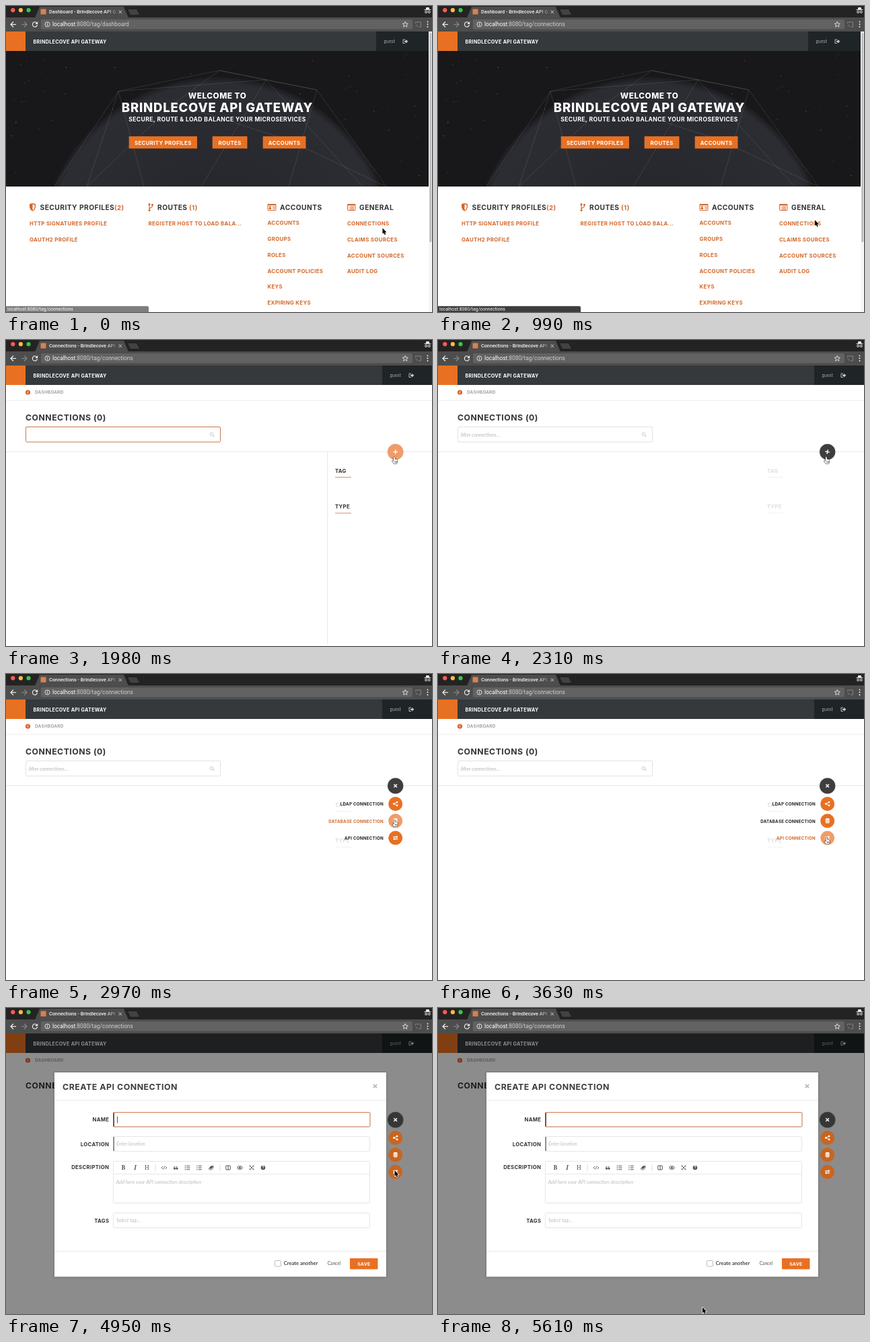
An HTML page with a canvas that plays this animation: 633 by 456 pixels, repeating every 5.94 s.

```html
<!DOCTYPE html>
<html lang="en">
<head>
<meta charset="utf-8">
<title>API gateway</title>
<style>
html, body { margin: 0; width: 100%; height: 100%; overflow: hidden; background: #fff; }
canvas { display: block; width: 633px; height: 456px; }
</style>
</head>
<body>
<canvas id="stage"></canvas>
<script>
const W = 633, H = 456, STEP = 330, LOOP = 5940;
const canvas = document.getElementById('stage');
const c = canvas.getContext('2d');
const ratio = window.devicePixelRatio || 1;
canvas.width = W * ratio;
canvas.height = H * ratio;

const ORANGE = '#e87022', LINK = '#d2682a', INK = '#343434';
const HEAD = 'Inter, sans-serif', UI = 'Roboto, sans-serif', BODY = 'Lato, sans-serif';
const PRODUCT = 'Brindlecove API Gateway';

// step, x, y, kind
const CURSOR = [
  [0, 559.5, 331, 'arrow'], [2, 560, 320, 'hand'], [3, 560, 319, 'arrow'],
  [5, 574, 192, 'arrow'], [6, 577, 174, 'hand'], [9, 577.5, 217, 'hand'],
  [10, 577.5, 243, 'hand'], [12, 577.5, 242, 'arrow'], [16, 472, 348, 'arrow'],
  [17, 393, 446, 'arrow']
];

function rect(x, y, w, h, fill) {
  c.fillStyle = fill;
  c.fillRect(x, y, w, h);
}
function box(x, y, w, h, stroke, r = 1, fill) {
  c.beginPath();
  c.roundRect(x, y, w, h, r);
  if (fill) { c.fillStyle = fill; c.fill(); }
  if (stroke) { c.strokeStyle = stroke; c.lineWidth = 1; c.stroke(); }
}
function disc(x, y, r, fill) {
  c.fillStyle = fill;
  c.beginPath();
  c.arc(x, y, r, 0, 7);
  c.fill();
}
function ring(x, y, r, stroke, width = 1, from = 0, to = 7) {
  c.strokeStyle = stroke;
  c.lineWidth = width;
  c.beginPath();
  c.arc(x, y, r, from, to);
  c.stroke();
}
function trace(pts) {
  c.beginPath();
  for (let i = 0; i < pts.length; i += 2) c.lineTo(pts[i], pts[i + 1]);
}
function line(pts, stroke, width = 1) {
  trace(pts);
  c.strokeStyle = stroke;
  c.lineWidth = width;
  c.stroke();
}
function poly(pts, fill) {
  trace(pts);
  c.closePath();
  c.fillStyle = fill;
  c.fill();
}
function text(str, x, y, size, fill, font = UI, style = '400', align = 'left') {
  c.font = `${style} ${size}px ${font}`;
  c.textAlign = align;
  c.fillStyle = fill;
  c.fillText(str, x, y);
}
// headings are set low and wide
function head(str, x, y, size, fill, align = 'left', weight = '700') {
  c.letterSpacing = `${size * 0.04}px`;
  text(str, x, y, size * 0.945, fill, HEAD, weight, align);
  c.letterSpacing = '0px';
}
function seeded(seed) {
  return () => (seed = (seed * 16807) % 2147483647) / 2147483647;
}

function drawChrome(page, url) {
  rect(0, 0, W, 18, '#232323');
  ['#fc5b57', '#fdbd3e', '#34c84a'].forEach((col, i) => disc(10.3 + i * 11.6, 6.2, 3.1, col));
  rect(0, 17, W, 21, '#4d4d4d');
  poly([43, 17.5, 50, 1, 175, 1, 182, 17.5], '#4d4d4d');
  poly([181, 5, 194, 5, 198, 13, 185, 13], '#424242');
  rect(51.5, 4.5, 8, 8, '#d9814c');

  c.save();
  c.beginPath();
  c.rect(60, 0, 103, 17);
  c.clip();
  const fade = c.createLinearGradient(148, 0, 163, 0);
  fade.addColorStop(0, '#f2f2f2');
  fade.addColorStop(1, '#777');
  text(`${page} - ${PRODUCT}`, 64, 11.3, 7.25, fade, UI, '500');
  c.restore();
  line([167.5, 6.5, 172, 11], '#ccc');
  line([172, 6.5, 167.5, 11], '#ccc');

  // incognito badge
  poly([623.5, 5.5, 624.5, 2, 628.5, 2, 629.5, 5.5], '#eee');
  rect(621.5, 5.2, 10, 1, '#eee');
  ring(624.2, 9, 1.5, '#eee');
  ring(628.8, 9, 1.5, '#eee');

  line([15, 27.5, 7, 27.5], '#eee', 1.2);
  line([11, 23.5, 7, 27.5, 11, 31.5], '#eee', 1.2);
  line([23, 27.5, 31, 27.5], '#858585', 1.2);
  line([27, 23.5, 31, 27.5, 27, 31.5], '#858585', 1.2);
  ring(43, 27.5, 3.6, '#eee', 1.2, 0.2, 5.5);
  poly([47.2, 23, 47.2, 27, 43.2, 27], '#eee');

  box(52, 20, 552, 14.5, null, 2, '#626262');
  ring(61.5, 27.3, 3.5, '#e4e4e4');
  rect(61, 26.6, 1, 2.8, '#e4e4e4');
  rect(61, 25, 1, 1, '#e4e4e4');
  text('localhost', 69, 30.3, 8.4, '#fff');
  const hostWidth = c.measureText('localhost').width;
  text(url, 69 + hostWidth, 30.3, 8.4, '#cfcfcf');

  const star = [];
  for (let i = 0; i <= 10; i++) {
    const a = i * Math.PI / 5 - Math.PI / 2, r = i % 2 ? 1.9 : 4.3;
    star.push(593.3 + r * Math.cos(a), 27.6 + r * Math.sin(a));
  }
  line(star, '#e8e8e8', 0.9);
  line([608.5, 26, 608.5, 24, 616.5, 24, 616.5, 31, 613, 31], '#8a8a8a', 0.9);
  ring(608.5, 31, 2.6, '#8a8a8a', 0.8, -1.57, 0);
  [23.5, 27.3, 31].forEach(y => disc(626.5, y, 1, '#eee'));
}

function drawHeader(right, split) {
  rect(0, 38, right, 29, '#35393c');
  rect(split, 38, right - split, 29, '#1f2427');
  rect(0, 38, 29, 29, ORANGE);
  head(PRODUCT.toUpperCase(), 40.5, 56, 7.6, '#fff');
  text('guest', split + 11.5, 55, 6.9, '#aaa', BODY);
  const x = split + 40;
  line([x + 3, 50, x, 50, x, 55.5, x + 3, 55.5], '#ccc', 0.9);
  rect(x + 2, 51.8, 3, 2, '#ccc');
  poly([x + 4.2, 49.8, x + 7.3, 52.8, x + 4.2, 55.8], '#ccc');
}

function drawHero() {
  c.save();
  c.beginPath();
  c.rect(0, 67, 628, 202);
  c.clip();
  rect(0, 67, 628, 203, '#18181a');
  const rand = seeded(41);
  for (let i = 0; i < 150; i++) {
    c.globalAlpha = 0.15 + rand() * 0.35;
    disc(rand() * 628, 67 + rand() * 200, 0.3 + rand() * 0.5, '#b5aaa0');
  }
  c.globalAlpha = 1;
  const globe = c.createRadialGradient(314, 370, 60, 314, 370, 264);
  globe.addColorStop(0, '#25262c');
  globe.addColorStop(0.6, '#2a2b31');
  globe.addColorStop(0.95, '#2c2d33');
  globe.addColorStop(1, '#1c1c1f');
  disc(314, 370, 264, globe);
  const web = 'rgba(190,190,195,.22)';
  [
    [72, 269, 167, 127, 317, 96, 462, 125, 565, 269],
    [167, 127, 386, 110, 530, 269], [167, 127, 205, 269],
    [317, 96, 250, 145, 120, 269], [386, 110, 290, 269],
    [317, 96, 386, 110, 462, 125, 420, 269],
    [250, 145, 420, 200, 565, 269], [167, 127, 120, 269]
  ].forEach(p => line(p, web, 0.7));
  c.restore();

  head('WELCOME TO', 314, 138, 12.5, '#fff', 'center', '800');
  head(PRODUCT.toUpperCase(), 314, 158.3, 19.6, '#fff', 'center', '800');
  head('SECURE, ROUTE & LOAD BALANCE YOUR MICROSERVICES', 314, 172.3, 9.15, '#fff', 'center');
  [['SECURITY PROFILES', 182.7, 101.3], ['ROUTES', 306.7, 51.8], ['ACCOUNTS', 381.7, 63.8]].forEach(([s, x, w]) => {
    rect(x, 194.2, w, 18.2, ORANGE);
    head(s, x + w / 2, 206.5, 8.3, '#fff', 'center');
  });
}

function drawList(title, x, first, items, indent, count, countX) {
  head(title, x + indent, 304, 10.85, INK);
  if (count) head(count, countX, 304, 10.2, LINK);
  items.forEach((s, i) => head(s, x, first + i * 23.75, 8.3, LINK));
}

function drawDashboard() {
  rect(0, 38, W, 418, '#fff');
  drawHeader(628, 550);
  drawHero();
  rect(628, 38, 5, 418, '#f6f6f6');
  box(629.3, 40, 3, 312, null, 1.5, '#bdbdbd');

  drawList('SECURITY PROFILES', 35, 327.2, ['HTTP SIGNATURES PROFILE', 'OAUTH2 PROFILE'], 15.5, '(2)', 161);
  drawList('ROUTES', 211.5, 327.2, ['REGISTER HOST TO LOAD BALA...'], 13.5, '(1)', 272);
  drawList('ACCOUNTS', 388.5, 326.3, ['ACCOUNTS', 'GROUPS', 'ROLES', 'ACCOUNT POLICIES', 'KEYS', 'EXPIRING KEYS'], 18.5);
  drawList('GENERAL', 507, 327, ['CONNECTIONS', 'CLAIMS SOURCES', 'ACCOUNT SOURCES', 'AUDIT LOG'], 18);

  // shield
  poly([35, 295, 39.5, 294, 44, 295, 44, 300, 42.5, 303.5, 39.5, 306, 36.5, 303.5, 35, 300], LINK);
  poly([39.5, 295.5, 42.6, 296.2, 42.6, 300, 41.5, 302.7, 39.5, 304.4], '#fff');
  // branch
  line([213, 296, 213, 304], LINK, 1.2);
  line([217.5, 297, 217, 299.5, 213, 302], LINK, 1.2);
  [[213, 295.5], [213, 304.5], [217.5, 296.2]].forEach(([x, y]) => disc(x, y, 1.5, LINK));
  // id card
  box(389, 295.5, 12, 9, LINK);
  rect(389, 295, 12, 2.2, LINK);
  disc(392.3, 299.4, 1.3, LINK);
  rect(390.5, 300.8, 3.7, 2.2, LINK);
  rect(396, 299, 4, 1, LINK);
  rect(396, 301.5, 4, 1, LINK);
  // window
  box(507.5, 295.5, 11.5, 9, LINK);
  rect(507.5, 295, 11.5, 2.2, LINK);
  [298.5, 300.5, 302.5].forEach(y => {
    rect(509.3, y, 1, 1, LINK);
    rect(511.3, y, 6, 1, LINK);
  });
}

function drawStatus(bg) {
  box(-2, 447.3, 214, 12, null, 2, bg);
  text('localhost:8080/tag/connections', 2, 454.4, 6.85, '#fff');
}

function drawPlus(fill, angle) {
  c.save();
  c.shadowColor = 'rgba(0,0,0,.25)';
  c.shadowBlur = 2 * ratio;
  disc(578.7, 166.7, 11.6, fill);
  c.restore();
  c.save();
  c.translate(578.7, 166.7);
  c.rotate(angle);
  rect(-3.3, -0.7, 6.6, 1.4, '#fff');
  rect(-0.7, -3.3, 1.4, 6.6, '#fff');
  c.restore();
}

function drawMenuButton(i, fill) {
  const x = 578.7, y = [193.5, 218.8, 244.3][i];
  disc(x, y, 10.5, fill);
  if (i === 0) {
    line([x + 2.5, y - 2.3, x - 2.3, y, x + 2.5, y + 2.3], '#fff', 0.9);
    [[-2.3, 0], [2.4, -2.4], [2.4, 2.4]].forEach(([a, b]) => disc(x + a, y + b, 1.4, '#fff'));
  } else if (i === 1) {
    box(x - 3, y - 3.8, 6, 7.6, null, 1.6, '#fff');
    [-1.9, 0.1, 2.1].forEach(d => rect(x - 3, y + d, 6, 0.5, fill));
  } else {
    rect(x - 3.5, y - 2.1, 5, 1.3, '#fff');
    rect(x - 1.5, y + 0.9, 5, 1.3, '#fff');
    poly([x + 1.2, y - 3.5, x + 3.8, y - 1.5, x + 1.2, y + 0.5], '#fff');
    poly([x - 1.2, y - 0.5, x - 3.8, y + 1.5, x - 1.2, y + 3.5], '#fff');
  }
}

function drawMenu(hover) {
  ['LDAP CONNECTION', 'DATABASE CONNECTION', 'API CONNECTION'].forEach((s, i) => {
    const on = i === hover;
    head(s, 560.9, [196, 221.6, 247][i], 6.55, on ? LINK : '#222', 'right');
    drawMenuButton(i, on ? '#f09c68' : ORANGE);
  });
}

function drawConnections(step) {
  const modal = step >= 12, faded = step >= 7, focused = step < 7;
  rect(0, 38, W, 418, '#fff');
  drawHeader(W, 559);
  disc(32.5, 78, 3.6, '#d9622b');
  line([33.3, 76.2, 31.5, 78, 33.3, 79.8], '#fff', 1);
  head('DASHBOARD', 43, 80.4, 6.75, '#a2a2a2');
  head('CONNECTIONS (0)', 29, 119.8, 12.95, INK);
  if (modal) return;

  rect(0, 89.5, W, 1, '#eee');
  rect(0, 166, W, 1, '#e8e8e8');
  box(29.5, 129.5, 289, 22.5, focused ? '#c9764b' : '#e2e2e2', 1.5, '#fff');
  if (!focused) text('filter connections...', 34, 143.5, 7.4, '#b5b5b5', BODY, 'italic 400');
  else if (step < 6) rect(34, 135.5, 0.9, 10.5, '#333');
  ring(305.6, 140.3, 2.4, '#ccc');
  line([307.4, 142.1, 309.5, 144.2], '#ccc', 1.2);

  if (!faded) rect(477, 167, 1, 286, '#e6e6e6');
  [['TAG', 197.5, 204], ['TYPE', 250.7, 257.5]].forEach(([s, y, rule]) => {
    head(s, 489, y, 8.2, faded ? '#dedede' : INK);
    rect(489, rule, 24, 1, faded ? '#f0f0f0' : '#d6906c');
  });

  const open = step >= 8;
  drawPlus(step < 6 ? ORANGE : step < 7 ? '#f09c68' : '#3e3e3e', open ? Math.PI / 4 : faded ? 0.2 : 0);
  if (open) drawMenu(step < 9 ? -1 : step < 10 ? 1 : 2);
}

function drawField(y, h, label, labelY, hint, hintY) {
  box(159.5, y, 381, h, '#e6e6e6', 1, '#fff');
  head(label, 153.3, labelY, 8.2, INK, 'right');
  if (hint) text(hint, 164, hintY, 7.4, '#bcbcbc', BODY, 'italic 400');
}

function drawTools() {
  const k = '#555', y = 238;
  text('B', 174.5, y + 3.1, 8.6, k, 'Noto Serif, serif', '700', 'center');
  text('I', 192, y + 3.1, 8.6, k, 'Noto Serif, serif', 'italic 700', 'center');
  text('H', 209.5, y + 3.1, 8.6, k, 'Noto Serif, serif', '400', 'center');
  [221.5, 317.5].forEach(x => rect(x, 233, 1, 10, '#ddd'));
  line([233, 236, 231, 238, 233, 240], k, 0.9);
  line([236.8, 236, 238.8, 238, 236.8, 240], k, 0.9);
  line([235.7, 235.3, 234.1, 240.7], k, 0.8);
  [250.5, 254].forEach(x => {
    disc(x, 239.2, 1.5, k);
    line([x - 1.1, 239, x - 0.8, 237, x + 1, 236], k, 0.9);
  });
  [266, 283.5].forEach((x, n) => [235.3, 238, 240.7].forEach(b => {
    if (n) rect(x, b - 0.8, 0.9, 1.7, k);
    else disc(x + 0.5, b, 0.8, k);
    rect(x + 2.3, b - 0.5, 5, 1, k);
  }));
  poly([301, 239.5, 304.5, 235.2, 309, 235.2, 305.5, 239.5], k);
  line([301, 239.5, 302.5, 241, 305.5, 241, 309, 236.8], k, 0.8);
  box(326.8, 235, 6.5, 6, k, 0.5);
  rect(329.6, 235, 1, 6, k);
  c.beginPath();
  c.ellipse(347.5, y, 3.7, 2.4, 0, 0, 7);
  c.strokeStyle = k;
  c.stroke();
  disc(347.5, y, 1.5, k);
  for (const a of [-1, 1]) for (const b of [-1, 1]) {
    line([365, y, 365 + a * 2.5, y + b * 2.5], k, 0.9);
    poly([365 + a * 3.3, y + b * 3.3, 365 + a * 0.9, y + b * 3.3, 365 + a * 3.3, y + b * 0.9], k);
  }
  disc(382, y, 3.3, k);
  text('?', 382, y + 2.1, 5.6, '#fff', HEAD, '700', 'center');
}

function drawModal(step) {
  rect(0, 38, W, 418, 'rgba(0,0,0,.45)');
  drawPlus('#363636', Math.PI / 4);
  for (let i = 0; i < 3; i++) drawMenuButton(i, '#c9651f');

  c.save();
  c.shadowColor = 'rgba(0,0,0,.3)';
  c.shadowBlur = 3 * ratio;
  rect(72, 96, 493, 304.5, '#fff');
  c.restore();
  head('CREATE API CONNECTION', 84, 121.7, 13.1, '#3c3c3c');
  line([545.8, 113.8, 551.2, 119.2], '#bbb', 1.8);
  line([551.2, 113.8, 545.8, 119.2], '#bbb', 1.8);
  rect(72, 137.3, 493, 1, '#e8e8e8');
  rect(72, 362, 493, 1, '#e8e8e8');

  drawField(155.5, 21.5, 'NAME', 169);
  box(159.5, 155.5, 381.5, 21.5, '#cc7a50', 1.5);
  rect(159.2, 156, 1.8, 20.5, '#7d4a32');
  if (![14, 17].includes(step)) rect(165, 161.5, 0.9, 10, '#444');
  drawField(191.5, 22, 'LOCATION', 205.6, 'Enter location', 205.3);
  rect(159.2, 192, 1.8, 21, '#858585');
  drawField(228.5, 62, 'DESCRIPTION', 239.7);
  rect(160, 247, 381, 1, '#e8e8e8');
  drawTools();
  text('Add here your API connection description', 163.5, 261.5, 7.4, '#bcbcbc', BODY, 'italic 400');
  drawField(305.5, 22, 'TAGS', 319.6, 'Select tag...', 319.3);

  box(399.5, 376.5, 9, 8.5, '#bdbdbd', 1);
  text('Create another', 412.7, 383.2, 7.6, '#444', BODY, '700');
  text('Cancel', 477.7, 383.2, 6.6, '#555', BODY);
  rect(511, 373, 41.5, 16.3, ORANGE);
  head('SAVE', 531.8, 383.8, 7.2, '#fff', 'center');
}

function drawCursor(step) {
  const [, x, y, kind] = CURSOR.filter(k => k[0] <= step).pop();
  c.save();
  c.translate(x, y);
  c.lineJoin = 'round';
  if (kind === 'arrow') {
    trace([0, 0, 0, 8.6, 1.9, 6.9, 3.2, 9.9, 4.7, 9.2, 3.5, 6.4, 6, 6.2]);
  } else {
    trace([-1, 0.6, -0.3, 0, 0.6, 0.6, 0.8, 3.6, 3.4, 4, 4.6, 5, 4.4, 8, 3.5, 10.5, -0.8, 10.5, -3.2, 6.8, -2.6, 5.7, -1, 7]);
  }
  c.closePath();
  c.lineWidth = kind === 'arrow' ? 1.4 : 1;
  c.strokeStyle = kind === 'arrow' ? '#fff' : '#111';
  c.stroke();
  c.fillStyle = kind === 'arrow' ? '#000' : '#fff';
  c.fill();
  if (kind === 'hand') [0.8, 2.1, 3.3].forEach(k => line([k, 6.5, k, 8.8], '#222', 0.6));
  c.restore();
}

function draw(step) {
  c.setTransform(ratio, 0, 0, ratio, 0, 0);
  if (step < 4) drawDashboard();
  else drawConnections(step);
  if (step >= 12) drawModal(step);
  drawChrome(step < 4 ? 'Dashboard' : 'Connections', `:8080/tag/${step < 3 ? 'dashboard' : 'connections'}`);
  if (step === 0) drawStatus('#7d7d7d');
  if (step === 2 || step === 3) drawStatus('#3d3d3d');
  if (step === 4) drawStatus('#b3b3b3');
  drawCursor(step);
}

const start = performance.now();
function tick() {
  draw(Math.floor(((performance.now() - start) % LOOP) / STEP));
  requestAnimationFrame(tick);
}
tick();
</script>
</body>
</html>
```
